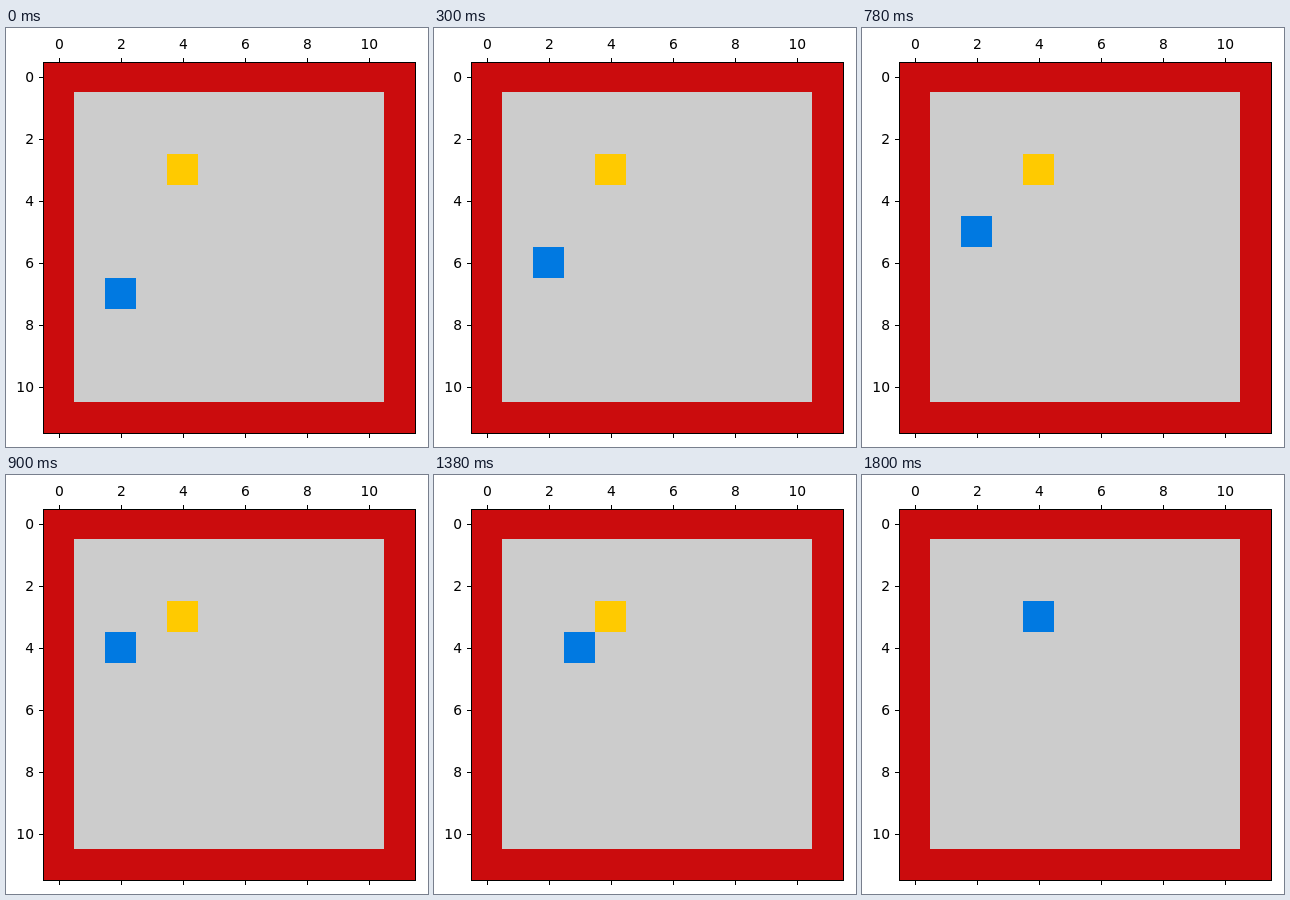
These frames come from a looping animation (422x419 px, 2100 ms). An HTML page with a canvas:

```html
<!DOCTYPE html>
<html lang="en">
<head>
<meta charset="utf-8">
<title>Grid walk</title>
<style>
  html, body { margin: 0; width: 100%; height: 100%; overflow: hidden; background: #fff; }
  canvas { display: block; }
</style>
</head>
<body>
<canvas id="stage" width="422" height="419"></canvas>
<script>
const ctx = document.getElementById('stage').getContext('2d');
const CELL = 31, LEFT = 37, TOP = 33, STEP_MS = 300;
const RED = '#cb0c0d', GREY = '#cccccc', GOLD = '#ffca00', BLUE = '#0079e1';
const goal = [4, 3];
const path = [[2, 7], [2, 6], [2, 5], [2, 4], [3, 4], [4, 4], [4, 3]];

function rect(color, x, y, w, h) {
  ctx.fillStyle = color;
  ctx.fillRect(x, y, w, h);
}

function cells(color, [col, row], size = 1) {
  rect(color, LEFT + col * CELL, TOP + row * CELL, size * CELL, size * CELL);
}

function label(text, x, y, align) {
  ctx.textAlign = align;
  ctx.fillText(text, x, y);
}

function drawAxes() {
  // Frame edges
  rect('#000', 37, 34, 373, 1);
  rect('#000', 37, 405, 373, 1);
  rect('#000', 37, 34, 1, 372);
  rect('#000', 409, 34, 1, 372);
  ctx.font = '13.89px "DejaVu Sans", sans-serif';
  for (let n = 0; n <= 10; n += 2) {
    const x = 53 + n * CELL, y = 49 + n * CELL;
    ctx.fillRect(x, 30, 1, 4);
    ctx.fillRect(x, 406, 1, 4);
    ctx.fillRect(33, y, 4, 1);
    label(n, x + 0.3, 21, 'center');
    label(n, 28, y + 5, 'right');
  }
}

function draw(now) {
  const step = Math.floor(now / STEP_MS) % path.length;
  rect('#fff', 0, 0, 422, 419);
  rect(RED, LEFT, 34, 372, 371);
  cells(GREY, [1, 1], 10);
  cells(GOLD, goal);
  cells(BLUE, path[step]);
  drawAxes();
}

function loop() {
  draw(performance.now() - start);
  requestAnimationFrame(loop);
}

const start = performance.now();
loop();
</script>
</body>
</html>
```
